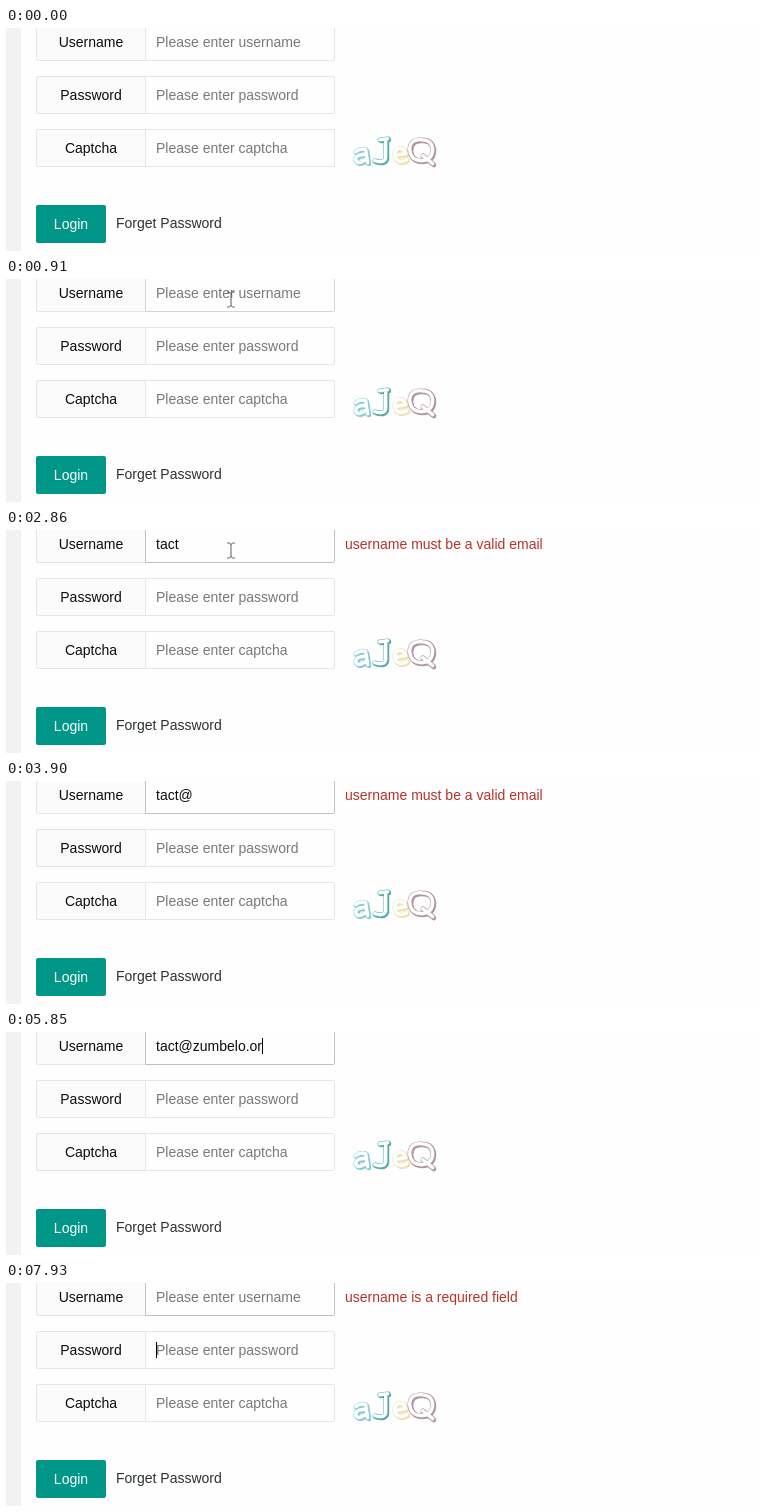
Recreate the animation shown at these times as an HTML page. Size 752 px wide and 223 px high, loop 8 s.

```html
<!DOCTYPE html>
<html lang="en">
<head>
<meta charset="utf-8">
<title>Login form</title>
<style>
  html, body { margin: 0; width: 100%; height: 100%; overflow: hidden; background: #fefefe; }
  body { font: 14px "Liberation Sans", Arial, sans-serif; color: #0c0c0c; position: relative; white-space: pre; }
  body > * { position: absolute; box-sizing: border-box; }
  .strip { left: 0; top: 0; width: 15px; height: 100%; background: #f1f2f1; }
  .label, .field { height: 38px; line-height: 36px; border: 1px solid #e6e6e6; }
  .label { left: 30px; width: 110px; text-align: center; background: #fbfbfb; border-radius: 2px 0 0 2px; }
  .field { left: 139px; width: 190px; padding-left: 10px; background: #fefefe; border-radius: 0 2px 2px 0; }
  .hint { color: #757b75; }
  .caret { position: absolute; top: 10px; width: 1px; height: 16px; background: #000; }
  .selected { background: #1967d2; color: #fff; }
  #error { left: 339px; top: -5px; line-height: 38px; color: #b83226; }
  .login { left: 30px; top: 177px; width: 70px; height: 38px; line-height: 38px; text-align: center;
    background: #009688; color: #fff; border-radius: 2px; }
  .forget { left: 110px; top: 177px; line-height: 36px; color: #2b3331; }
  svg { left: 0; top: 0; fill: none; stroke-linecap: round; stroke-linejoin: round; }
</style>
</head>
<body>
<div class="strip"></div>
<div class="label" style="top:-5px">Username</div>
<div class="field" id="user" style="top:-5px"><span id="typed"></span><i class="caret" id="userCaret"></i><span class="hint" id="userHint">Please enter username</span></div>
<div class="label" style="top:48px">Password</div>
<div class="field" id="pass" style="top:48px"><i class="caret" id="passCaret"></i><span class="hint">Please enter password</span></div>
<div class="label" style="top:101px">Captcha</div>
<div class="field" style="top:101px"><span class="hint">Please enter captcha</span></div>
<div id="error"></div>
<div class="login">Login</div>
<div class="forget">Forget Password</div>
<svg width="752" height="223">
  <defs>
    <path id="ga" d="M350 124Q355 120 360 122L362 135M361 127Q350 126 350 132Q352 138 361 131"/>
    <path id="gJ" d="M374 112L382 111M380 112L380 130Q379 136 369 133"/>
    <path id="ge" d="M389 128L400 126Q398 119 392 121Q387 125 390 131Q394 136 401 132"/>
    <path id="gQ" d="M416 112Q404 111 404 122Q405 133 416 133Q427 132 427 121Q426 112 416 112M417 128L427 136"/>
  </defs>
  <g id="captcha"></g>
  <path id="mouse" stroke="#5c5c5c" d="M-3.5 -7.5H-1.5L0 -6L1.5 -7.5H3.5M0 -6V6M-3.5 7.5H-1.5L0 6L1.5 7.5H3.5"/>
</svg>
<script>
  const LOOP = 8000, TICK = 130;
  const EMAIL = "tact@zumbelo.org";
  const KEYS = [1820, 1950, 2080, 2210, 3510, 4290, 4550, 4680, 4810,
    5070, 5200, 5330, 5460, 5590, 5850, 5980];
  const CARET_ON = [[1300, 2860], [3120, 3900], [4160, 6760], [7280, 7930]];
  const HOVER = 910, FOCUS = 1300, VALID = 5850, SELECT = 6760, CLEAR = 7280, TAB = 7930;
  const $ = id => document.getElementById(id);
  const clamp = x => Math.max(0, Math.min(1, x));
  const show = (el, on) => el.style.display = on ? "" : "none";

  // Hollow letters: a coloured shadow, an outline and a pale core.
  const letters = [["a", "#86ccd2"], ["J", "#55aaa9"], ["e", "#f0e0ae"], ["Q", "#b5939f"]];
  $("captcha").innerHTML = letters.map(([name, color]) =>
    [[color, 4.5, 1, 1], [color, 5, 0, 0], ["#fdfefe", 3.4, -.3, -.3]].map(([stroke, width, x, y]) =>
      `<use href="#g${name}" x="${x}" y="${y}" stroke="${stroke}" stroke-width="${width}"/>`).join("")).join("");

  const grey = v => `rgb(${v},${v},${v})`;

  function draw(t) {
    const step = Math.floor(t / TICK) * TICK;
    const count = t < CLEAR ? KEYS.filter(k => t >= k).length : 0;
    $("typed").textContent = EMAIL.slice(0, count);
    $("typed").className = t >= SELECT && t < CLEAR ? "selected" : "";
    show($("userHint"), !count);
    show($("userCaret"), CARET_ON.some(([a, b]) => t >= a && t < b));
    show($("passCaret"), t >= TAB);

    $("error").textContent = t >= CLEAR ? "username is a required field"
      : t >= KEYS[0] && t < VALID ? "username must be a valid email" : "";

    const hover = clamp((step - HOVER + 260) / 260), focus = clamp((step - FOCUS) / 200);
    $("user").style.borderColor = grey(Math.round(230 - 18 * hover - 20 * focus));

    const p = clamp((step - TICK) / (HOVER - TICK)), ease = 1 - (1 - p) ** 2;
    const x = Math.round(262 - 37 * ease) + .5, y = Math.round(-12 + 32 * ease) + .5;
    $("mouse").setAttribute("transform", `translate(${x - .5} ${y})`);
    show($("mouse"), t >= TICK && t < 3120);
  }

  let start;
  function loop(now) {
    start ??= now;
    draw((now - start) % LOOP);
    requestAnimationFrame(loop);
  }
  draw(0);
  requestAnimationFrame(loop);
</script>
</body>
</html>
```
